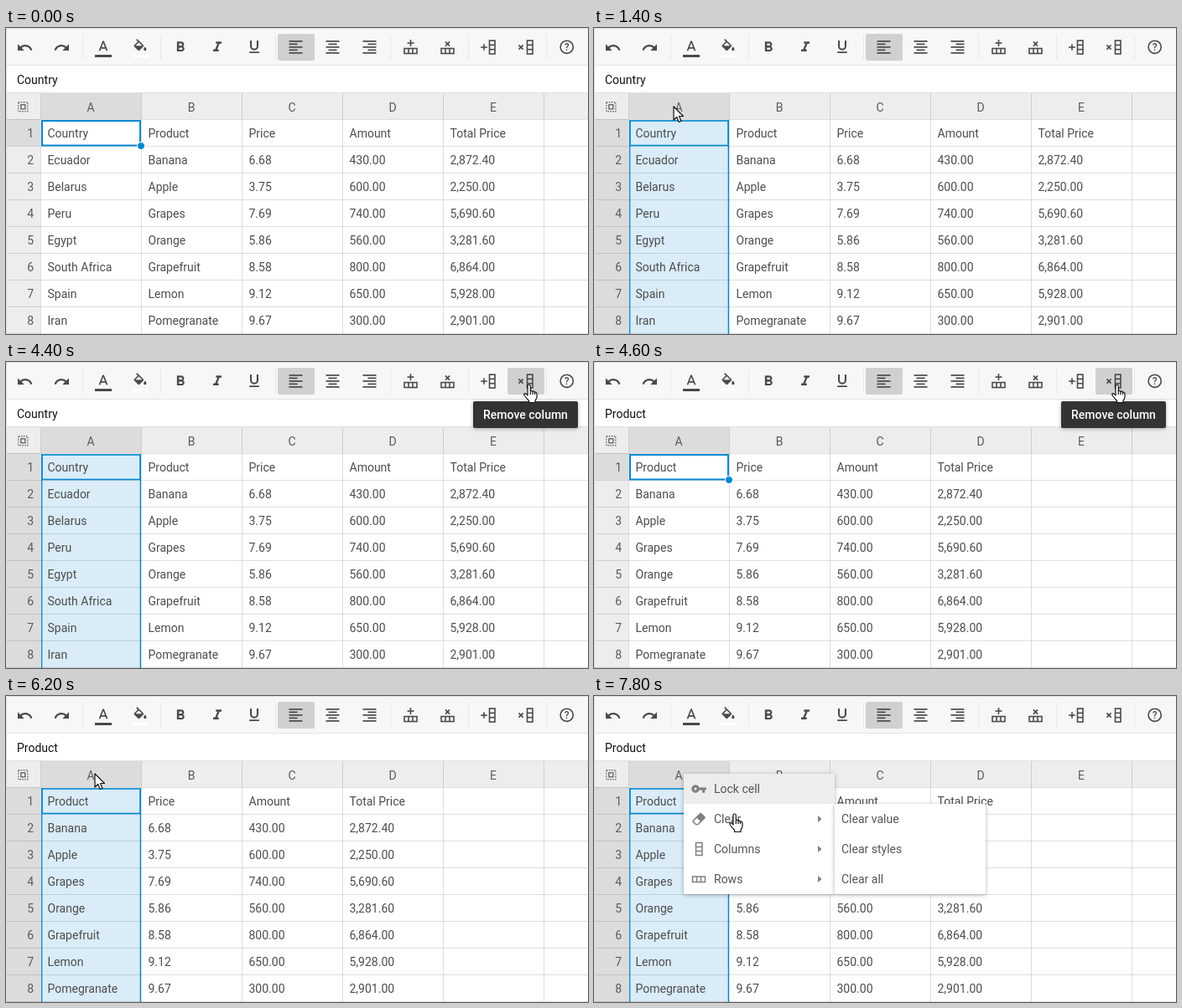
These frames come from a looping animation (694 by 366 pixels, 8 s). An HTML page with a canvas:

```html
<!DOCTYPE html>
<html lang="en">
<head>
<meta charset="utf-8">
<title>Spreadsheet</title>
<style>
html, body { margin: 0; width: 100%; height: 100%; overflow: hidden; background: #fff; }
canvas { display: block; width: 694px; height: 366px; }
</style>
</head>
<body>
<canvas id="stage" width="694" height="366"></canvas>
<script>
const ctx = document.getElementById('stage').getContext('2d');
const W = 694, H = 366, LOOP = 8000, STEP = 200;
const ROW = 32, COL = 120, LEFT = 41, TOP = 109;
const LINE = '#dfdfdf', HEAD = '#ededed', HEAD_ON = '#dcdcdc';
const BLUE = '#0288d1', TEXT = '#4d4d4d', ICON = '#4a4a4a', FONT = 'Roboto, Arial, sans-serif';

const TITLES = ['Country', 'Product', 'Price', 'Amount', 'Total Price'];
const STOCK = [
  ['Ecuador', 'Banana', 6.68, 430],
  ['Belarus', 'Apple', 3.75, 600],
  ['Peru', 'Grapes', 7.69, 740],
  ['Egypt', 'Orange', 5.86, 560],
  ['South Africa', 'Grapefruit', 8.58, 800],
  ['Spain', 'Lemon', 9.12, 650],
  ['Iran', 'Pomegranate', 9.67, 300]
];
const money = n => n.toLocaleString('en-US', { minimumFractionDigits: 2, maximumFractionDigits: 2 });
const SHEET = [TITLES, ...STOCK.map(([land, item, price, amount]) =>
  [land, item, money(price), money(amount), money(price * amount)])];

// Icons on a 24 unit grid
const UNDO = new Path2D('M12.5 8C9.85 8 7.45 9 5.6 10.6L2 7V16H11L7.4 12.4C8.8 11.2 10.5 10.5 12.5 10.5C16 10.5 19 12.8 20.1 16L22.5 15.2C21.1 11 17.2 8 12.5 8Z');
const LETTER_A = new Path2D('M11 3L5.5 17H7.75L8.87 14H15.12L16.25 17H18.5L13 3ZM9.62 12L12 5.67L14.38 12Z');
const BUCKET = new Path2D('M19 11.5S17 13.7 17 15A2 2 0 0 0 21 15C21 13.7 19 11.5 19 11.5ZM5.2 10H14.8L10 5.2ZM16.6 8.9L7.6 0L6.2 1.4L8.6 3.8L3.4 8.9Q2.4 10 3.4 11.1L8.9 16.6Q10 17.5 11.1 16.6L16.6 11.1Q17.6 10 16.6 8.9Z');
const BOLD = new Path2D('M15.6 10.8C16.6 10.1 17.25 9 17.25 8C17.25 5.7 15.5 4 13.25 4H7V18H14C16.1 18 17.75 16.3 17.75 14.2C17.75 12.7 16.9 11.4 15.6 10.8ZM10 6.5H13A1.5 1.5 0 0 1 13 9.5H10ZM13.5 15.5H10V12.5H13.5A1.5 1.5 0 0 1 13.5 15.5Z');
const ITALIC = new Path2D('M10 4V7H12.2L8.8 15H6V18H14V15H11.8L15.2 7H18V4Z');
const UNDERLINE = new Path2D('M12 17A6 6 0 0 0 18 11V3H15.5V11A3.5 3.5 0 0 1 8.5 11V3H6V11A6 6 0 0 0 12 17ZM5 19V21H19V19Z');
const KEY = new Path2D('M12.6 10A6 6 0 1 0 12.6 14H17V18H21V14H23V10ZM7 14A2 2 0 1 1 7 10A2 2 0 1 1 7 14Z');
const ERASER = new Path2D('M16.2 3.6L21.2 8.5Q22.6 10 21.2 11.4L12 20.5Q9.2 22.4 6.3 20.5L2.8 17Q1.4 15.5 2.8 14.1L13.4 3.6Q14.8 2.3 16.2 3.6ZM4.2 15.5L7.7 19.1Q9.2 20.2 10.6 19.1L14.1 15.5L9.2 10.6Z');
const ARROW = new Path2D('M0 0V16L3.7 12.5L6.3 18.5L9 17.3L6.5 11.5H11.5Z');
const HAND = new Path2D('M5 13V2Q5 0 6.7 0Q8.3 0 8.3 2V8Q9.6 6.4 11 8.4Q12.6 7.2 13.5 9.3Q16 8.6 16 11V15Q15.8 17 14 19V21.5H6.6V19.5Q4 16.8 1.2 13Q.2 11.2 1.6 10.6Q3.2 10.4 5 13Z');

function box(x, y, w, h, color) {
  ctx.fillStyle = color;
  ctx.fillRect(x, y, w, h);
}

function label(text, x, mid, color = TEXT, align = 'left', style = '14px') {
  ctx.font = `${style} ${FONT}`;
  ctx.fillStyle = color;
  ctx.textAlign = align;
  ctx.fillText(text, x, mid + 5);
}

function icon(path, cx, cy, scale = 0.833, color = ICON, flip = 1) {
  ctx.save();
  ctx.translate(cx, cy);
  ctx.scale(scale * flip, scale);
  ctx.translate(-12, -12);
  ctx.fillStyle = color;
  ctx.fill(path, 'evenodd');
  ctx.restore();
}

function seg(x1, y1, x2, y2) {
  ctx.beginPath();
  ctx.moveTo(x1, y1);
  ctx.lineTo(x2, y2);
  ctx.stroke();
}

function pen(color, width) {
  ctx.strokeStyle = color;
  ctx.lineWidth = width;
}

function strip(x, y, w, h, color = ICON, width = 1.6) {
  pen(color, width);
  ctx.strokeRect(x, y, w, h);
  for (const k of [1 / 3, 2 / 3]) {
    if (w > h) seg(x + w * k, y, x + w * k, y + h);
    else seg(x, y + h * k, x + w, y + h * k);
  }
}

function sign(x, y, r, cross) {
  pen(ICON, 1.6);
  if (cross) {
    seg(x - r, y - r, x + r, y + r);
    seg(x - r, y + r, x + r, y - r);
  } else {
    seg(x - r, y, x + r, y);
    seg(x, y - r, x, y + r);
  }
}

function alignIcon(cx, side) {
  for (let i = 0; i < 5; i++) {
    const w = i % 2 ? 10 : 16;
    box(cx - 8 + (16 - w) * side, 15 + i * 3.5, w, 1.7, ICON);
  }
}

function toolbar(button) {
  box(0, 0, W, 45, '#f7f7f7');
  for (const x of [91, 184, 321, 458, 551, 644]) box(x, 8, 1, 30, '#e8e8e8');
  rounded(324, 7, 44, 32, 2, '#d0d0d0');
  if (button) rounded(598, 7, 44, 32, 2, button);

  icon(UNDO, 22.5, 23.5, 0.85);
  icon(UNDO, 66.5, 23.5, 0.85, ICON, -1);
  icon(LETTER_A, 116, 23);
  box(106, 32, 20, 3, ICON);
  icon(BUCKET, 160, 23);
  box(150, 32, 20, 3, '#fff');
  icon(BOLD, 208, 23);
  icon(ITALIC, 252, 23);
  icon(UNDERLINE, 296, 22.5);
  [345.5, 389.5, 433.5].forEach((x, i) => alignIcon(x, i / 2));

  sign(482.5, 18, 4, false);
  strip(475, 24.5, 15, 6);
  sign(526.5, 19, 2.6, true);
  strip(519, 24.5, 15, 6);
  sign(570, 23, 3.8, false);
  strip(576.5, 15, 6.5, 16);
  sign(614, 23, 2.6, true);
  strip(621.5, 15, 6.5, 16);

  pen(ICON, 1.6);
  ctx.beginPath();
  ctx.arc(668.7, 22.8, 7.6, 0, 7);
  ctx.stroke();
  label('?', 668.7, 22.3, ICON, 'center', '500 12px');
}

function rounded(x, y, w, h, r, color) {
  ctx.fillStyle = color;
  ctx.beginPath();
  ctx.roundRect(x, y, w, h, r);
  ctx.fill();
}

function selectAll() {
  pen('#666', 1.4);
  ctx.setLineDash([1.5, 1.5]);
  ctx.strokeRect(14.8, 88.8, 11, 11);
  ctx.setLineDash([]);
  ctx.strokeRect(17.8, 91.8, 5, 5);
}

function grid(rows, whole) {
  box(0, 45, W, H - 45, '#fff');
  label(rows[0][0], 13, 62, '#111');
  box(0, 77, W, 32, HEAD);
  box(0, TOP, LEFT, H - TOP, HEAD);
  box(LEFT + 1, 78, COL - 1, 31, HEAD_ON);
  box(0, TOP, LEFT, whole ? H - TOP : ROW, HEAD_ON);
  if (whole) box(LEFT + 1, TOP + 1, COL - 1, H - TOP, '#d9ecf8');

  box(0, 44, W, 1, '#e4e4e4');
  box(0, 77, W, 1, LINE);
  const shade = 'rgba(0,0,0,.125)';
  for (let y = TOP; y < H; y += ROW) box(0, y, W, 1, shade);
  for (let x = LEFT; x < W; x += COL) box(x, 78, 1, H - 78, shade);

  selectAll();
  [...'ABCDE'].forEach((c, i) => label(c, 101 + i * COL, 95, '#5a5a5a', 'center'));
  rows.forEach((row, r) => {
    const mid = 126 + r * ROW;
    label(r + 1, 33, mid, '#5a5a5a', 'right');
    row.forEach((v, c) => label(v, 49.5 + c * COL, mid));
  });

  if (whole) {
    box(42, 110, 1.3, H, BLUE);
    box(159.7, 110, 1.3, H, BLUE);
  }
  pen(BLUE, whole ? 1.6 : 2);
  ctx.strokeRect(43, 111, 117, 29.5);
  if (!whole) {
    ctx.beginPath();
    ctx.arc(161, 141, 4.5, 0, 7);
    ctx.fillStyle = BLUE;
    ctx.fill();
    pen('#fff', 1);
    ctx.stroke();
  }
  box(0, 0, W, 1, LINE);
  box(0, 0, 1, H, LINE);
}

function panel(x, y, w, h, color = '#fff') {
  ctx.save();
  ctx.shadowColor = 'rgba(0,0,0,.3)';
  ctx.shadowBlur = 5;
  ctx.shadowOffsetY = 1;
  rounded(x, y, w, h, 2, color);
  ctx.restore();
}

function tooltip(alpha) {
  ctx.globalAlpha = alpha;
  panel(557, 47, 125, 32, '#333');
  label('Remove column', 619.5, 63, '#fff', 'center', '500 14px');
  ctx.globalAlpha = 1;
}

function menu(hover, open) {
  const gray = '#808080';
  panel(107, 93, 180, 144);
  if (hover >= 0) box(107, 93 + hover * 36, 180, 36, '#ededed');
  ['Lock cell', 'Clear', 'Columns', 'Rows'].forEach((name, i) => {
    const mid = 111 + i * 36;
    label(name, 143, mid, '#555');
    if (!i) return;
    ctx.beginPath();
    ctx.moveTo(267, mid - 4);
    ctx.lineTo(271.5, mid);
    ctx.lineTo(267, mid + 4);
    ctx.fillStyle = gray;
    ctx.fill();
  });
  icon(KEY, 125, 111, 0.8, gray);
  icon(ERASER, 125, 147, 0.8, gray);
  strip(121.5, 175.5, 7.5, 15, gray, 1.5);
  strip(117.5, 216, 15, 6.5, gray, 1.5);
  if (!open) return;
  panel(287, 129, 180, 108);
  ['value', 'styles', 'all'].forEach((s, i) => label('Clear ' + s, 295, 147 + i * 36, '#555'));
}

// Pointer stops: time, x, y
const STOPS = [
  [200, 330, 250], [1200, 95, 94], [1400, 95, 94], [2600, 613, 24], [2800, 617, 27],
  [4600, 617, 27], [5400, 160, 79], [5800, 106, 93], [7200, 106, 93],
  [7800, 161, 141], [LOOP, 161, 141]
];

function pointerAt(t) {
  const i = STOPS.findIndex(s => s[0] > t);
  const [t0, x0, y0] = STOPS[i - 1], [t1, x1, y1] = STOPS[i];
  const k = (t - t0) / (t1 - t0);
  const e = k * k * (3 - 2 * k);
  // keep low beneath the toolbar on the way to the button
  const dip = t0 === 1400 ? 26 * Math.sin(Math.PI * k) : 0;
  return [x0 + (x1 - x0) * e, y0 + (y1 - y0) * e + dip];
}

function pointer(t) {
  if (t < 200) return;
  const [x, y] = pointerAt(t);
  ctx.save();
  ctx.translate(x, y);
  if (t === 5400) {
    for (const [color, width] of [['#fff', 4], ['#111', 1.5]]) {
      pen(color, width);
      for (const s of [-1, 1]) {
        seg(s * 2, -8, s * 2, 8);
        seg(s * 2, 0, s * 10, 0);
        seg(s * 10, 0, s * 6.5, -3.5);
        seg(s * 10, 0, s * 6.5, 3.5);
      }
    }
  } else {
    const hand = (t >= 2600 && t < 4800) || t >= 7400;
    const shape = hand ? HAND : ARROW;
    ctx.fillStyle = '#fff';
    ctx.fill(shape);
    pen('#111', 1.2);
    ctx.lineJoin = 'round';
    ctx.stroke(shape);
    if (hand) for (const fx of [8.3, 11, 13.5]) seg(fx, 8.5, fx, 12);
  }
  ctx.restore();
}

function draw(t) {
  const removed = t >= 4600;
  const rows = removed ? SHEET.map(r => r.slice(1)) : SHEET;
  const whole = (t >= 1400 && !removed) || t >= 6200;
  let button = null;
  if (t >= 2600 && t < 4800) button = t >= 4400 ? '#d0d0d0' : '#e4e4e4';

  toolbar(button);
  grid(rows, whole);
  if (t >= 3400 && t < 4800) tooltip(t < 3600 ? 0.5 : 1);
  if (t >= 7200) menu(t >= 7400 ? 0 : -1, t >= 7800);
  pointer(t);
}

const start = performance.now();
let shown = -1;
function tick() {
  const t = Math.floor((performance.now() - start) % LOOP / STEP) * STEP;
  if (t !== shown) draw(shown = t);
  requestAnimationFrame(tick);
}
tick();
</script>
</body>
</html>
```
